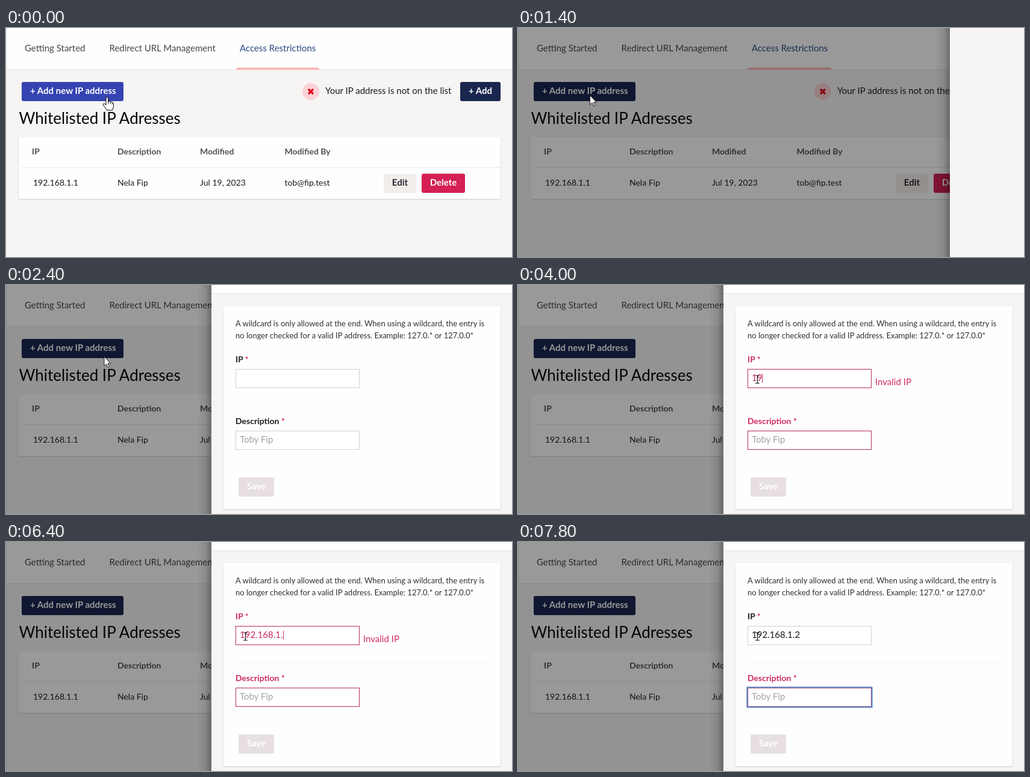
These frames come from a looping animation (840 by 382 pixels, 8000 ms). An HTML page:

```html
<!DOCTYPE html>
<html lang="en">
<head>
<meta charset="utf-8">
<title>IP access restrictions</title>
<style>
  html, body { margin: 0; width: 100%; height: 100%; overflow: hidden; background: #f6f5f4; }
  svg { display: block; width: 840px; height: 382px; }
  text { font: 15px Lato, "Open Sans", sans-serif; fill: #1c1c20; white-space: pre; }
  .bold { font-weight: 700; }
  .white { fill: #fff; }
  .nav { fill: #47474c; }
  .head { font-size: 14px; font-weight: 700; fill: #515054; }
  .cell { font-size: 14px; }
  .hint { font-size: 13px; fill: #303033; }
  .label { font-size: 14px; font-weight: 700; fill: #1c1c20; }
  .red { fill: #cf2b62; }
  .placeholder { fill: #a3a2a4; }
  .card { fill: #fefefe; filter: drop-shadow(0 1px 1px rgba(0, 0, 0, .17)); }
  .field { fill: #fff; stroke: #d2d1d3; }
  .field.bad { stroke: #b52d62; }
</style>
</head>
<body>
<svg id="stage" viewBox="0 0 840 382">
  <defs>
    <linearGradient id="shade">
      <stop offset="0" stop-color="#000" stop-opacity="0"/>
      <stop offset=".55" stop-color="#000" stop-opacity=".08"/>
      <stop offset="1" stop-color="#000" stop-opacity=".3"/>
    </linearGradient>
  </defs>

  <g id="page">
    <rect width="840" height="382" fill="#f6f5f4"/>
    <rect width="840" height="69" fill="#fefefe"/>
    <rect y="69" width="840" height="1" fill="#e6e5e6"/>
    <rect width="1" height="382" fill="#e0dfe0"/>
    <text class="nav" x="31" y="39">Getting Started</text>
    <text class="nav" x="171.500" y="39">Redirect URL Management</text>
    <text x="388" y="39" style="fill:#2b4a80">Access Restrictions</text>
    <path d="M382 70v-1q0-3 3-3h132q3 0 3 3v1z" fill="#fabab9"/>

    <rect id="newButton" x="26" y="90" width="169" height="32" rx="3"/>
    <text class="bold white" x="40" y="110">+ Add new IP address</text>
    <circle cx="506" cy="106" r="14" fill="#fbd3d7"/>
    <path d="M502 102l8 8m0-8l-8 8" stroke="#e30b1c" stroke-width="3.200"/>
    <text x="530" y="110">Your IP address is not on the list</text>
    <rect x="754" y="90" width="67" height="32" rx="3" fill="#1b264f"/>
    <text class="bold white" x="768" y="110">+ Add</text>

    <text x="21.500" y="160" style="font-size:26px;fill:#060606">Whitelisted IP Adresses</text>
    <rect class="card" x="21" y="182" width="800" height="103" rx="3"/>
    <rect x="26" y="232" width="795" height="1" fill="#eae9ea"/>
    <text class="head" x="43" y="211">IP</text>
    <text class="head" x="185" y="211">Description</text>
    <text class="head" x="322" y="211">Modified</text>
    <text class="head" x="462.500" y="211">Modified By</text>
    <text class="cell" x="45" y="263">192.168.1.1</text>
    <text class="cell" x="185" y="263">Nela Fip</text>
    <text class="cell" x="322" y="263">Jul 19, 2023</text>
    <text class="cell" x="462.500" y="263">tob@fip.test</text>
    <rect x="627" y="243" width="54" height="32" rx="3" fill="#f2eeeb"/>
    <text class="bold" x="654" y="263" text-anchor="middle" style="fill:#2a2a33">Edit</text>
    <rect x="690" y="243" width="72" height="32" rx="3" fill="#d42054"/>
    <text class="bold white" x="726" y="263" text-anchor="middle">Delete</text>
  </g>

  <rect id="overlay" width="840" height="382" opacity=".4"/>

  <g id="panel">
    <rect x="-24" width="24" height="382" fill="url(#shade)"/>
    <rect width="840" height="382" fill="#f6f5f4"/>
  </g>

  <g id="form">
    <rect x="341" width="499" height="14" fill="#fefefe"/>
    <rect x="341" y="14" width="499" height="1" fill="#e6e5e6"/>
    <rect class="card" x="361" y="35" width="460" height="339" rx="3"/>
    <path d="M381 202.500h420M381 305.500h420" stroke="#f7f6f6"/>
    <text class="hint" x="381" y="69">A wildcard is only allowed at the end. When using a wildcard, the entry is</text>
    <text class="hint" x="381" y="89">no longer checked for a valid IP address. Example: 127.0.* or 127.0.0*</text>

    <text id="ipLabel" class="label" x="381" y="129">IP <tspan class="red">*</tspan></text>
    <rect id="ipField" class="field" x="381.500" y="140.500" width="205" height="31"/>
    <text id="ipText" x="388" y="160"></text>
    <text id="error" class="red" x="593" y="167">Invalid IP</text>

    <text id="noteLabel" class="label" x="381" y="232">Description <tspan class="red">*</tspan></text>
    <rect id="noteRing" x="380" y="242" width="208" height="34" rx="1" fill="none" stroke="#82a9dc" stroke-width="2"/>
    <rect id="noteField" class="field" x="381.500" y="243.500" width="205" height="31"/>
    <text class="placeholder" x="388" y="263">Toby Fip</text>
    <rect id="caret" y="148" width="1" height="15" fill="#cf2b62"/>

    <rect x="386" y="321" width="59" height="32" rx="3" fill="#e7dfe0"/>
    <text class="bold white" x="415.500" y="341" text-anchor="middle">Save</text>
  </g>

  <g id="hand">
    <path d="M-2 12V1.500Q-2 0-.2 0T1.700 1.500V7Q4.600 5.800 5.200 7.800Q7.700 6.800 8.300 8.900Q10.500 8.300 10.500 11V15Q10.500 17.500 8.500 21.500H-.5Q-3 17.500-6.300 13.500Q-7.500 11.500-6 10.700Q-4.500 10-2 13z"
      fill="#fff" stroke="#000" stroke-linejoin="round"/>
    <path d="M1.700 7v4M5.200 8v3M8.300 9v3" stroke="#000" fill="none"/>
  </g>
  <path id="arrow" d="M.5 .5V16L4.100 12.700L6.700 18.300L9 17.200L6.500 11.800H11.300z" fill="#fff" stroke="#222"/>
  <path id="beam" d="M-3.500-6.500H-1Q0-6.500 0-5.500V5.500Q0 6.500-1 6.500H-3.500M3.500-6.500H1Q0-6.500 0-5.500M0 5.500Q0 6.500 1 6.500H3.500"
    fill="none" stroke="#111" stroke-width="1.200"/>
</svg>

<script>
  const LOOP = 8000, STEP = 200;
  const OPEN = 1400, LOADED = 2000, CLICKED = 3200, VALID = 6800, TABBED = 7400;

  // [time, number of characters typed]
  const typing = [[3600, 1], [4000, 2], [4200, 3], [4400, 4], [4800, 5],
                  [5200, 6], [5600, 7], [6400, 10], [6800, 11]];
  const address = "192.168.1.2";

  const el = Object.fromEntries([...document.querySelectorAll("[id]")].map(e => [e.id, e]));
  const show = (node, on) => node.setAttribute("display", on ? "inline" : "none");
  const moveTo = (node, x, y) => node.setAttribute("transform", `translate(${x} ${y})`);
  const mix = (a, b, k) => a + (b - a) * k;
  const ease = (t, from, to) => {
    const k = Math.min(1, Math.max(0, (t - from) / (to - from)));
    return k * k * (3 - 2 * k);
  };

  function drawPointer(t) {
    const kind = t < OPEN ? "hand" : t < 3000 ? "arrow" : "beam";
    for (const name of ["hand", "arrow", "beam"]) show(el[name], name === kind);
    if (kind === "hand") {
      const k = ease(t, 0, 800);
      moveTo(el.hand, mix(168, 121.5, k), mix(115.5, 113.5, k));
    } else {
      const k = ease(t, 2200, 3000);
      moveTo(el[kind], mix(119, 397.5, k), mix(112, 157.5, k));
    }
  }

  function drawForm(t) {
    show(el.form, t >= LOADED);
    const count = typing.reduce((n, [time, chars]) => t >= time ? chars : n, 0);
    const touched = t >= CLICKED;
    const ipBad = touched && t < VALID;
    const tabbed = t >= TABBED;

    el.ipText.textContent = address.slice(0, count);
    for (const node of [el.ipLabel, el.ipText]) node.classList.toggle("red", ipBad);
    el.ipField.classList.toggle("bad", ipBad);
    show(el.error, ipBad && count > 0);

    el.noteLabel.classList.toggle("red", touched);
    el.noteField.classList.toggle("bad", touched);
    el.noteField.style.stroke = tabbed ? "#743472" : "";
    show(el.noteRing, tabbed);

    show(el.caret, touched && !tabbed);
    const width = count ? el.ipText.getComputedTextLength() : 0;
    el.caret.setAttribute("x", Math.round(388 + width));
    el.caret.setAttribute("fill", ipBad ? "#cf2b62" : "#303033");
  }

  function draw(time) {
    const t = Math.floor(time % LOOP / STEP) * STEP;
    const open = t >= OPEN;
    el.newButton.setAttribute("fill", open ? "#1b264f" : "#3544b1");
    show(el.overlay, open);
    show(el.panel, open);
    moveTo(el.panel, t < 1600 ? 717 : t < 1800 ? 368 : 341, 0);
    drawForm(t);
    drawPointer(t);
  }

  const start = performance.now();
  function tick() {
    draw(performance.now() - start);
    requestAnimationFrame(tick);
  }
  tick();
</script>
</body>
</html>
```
